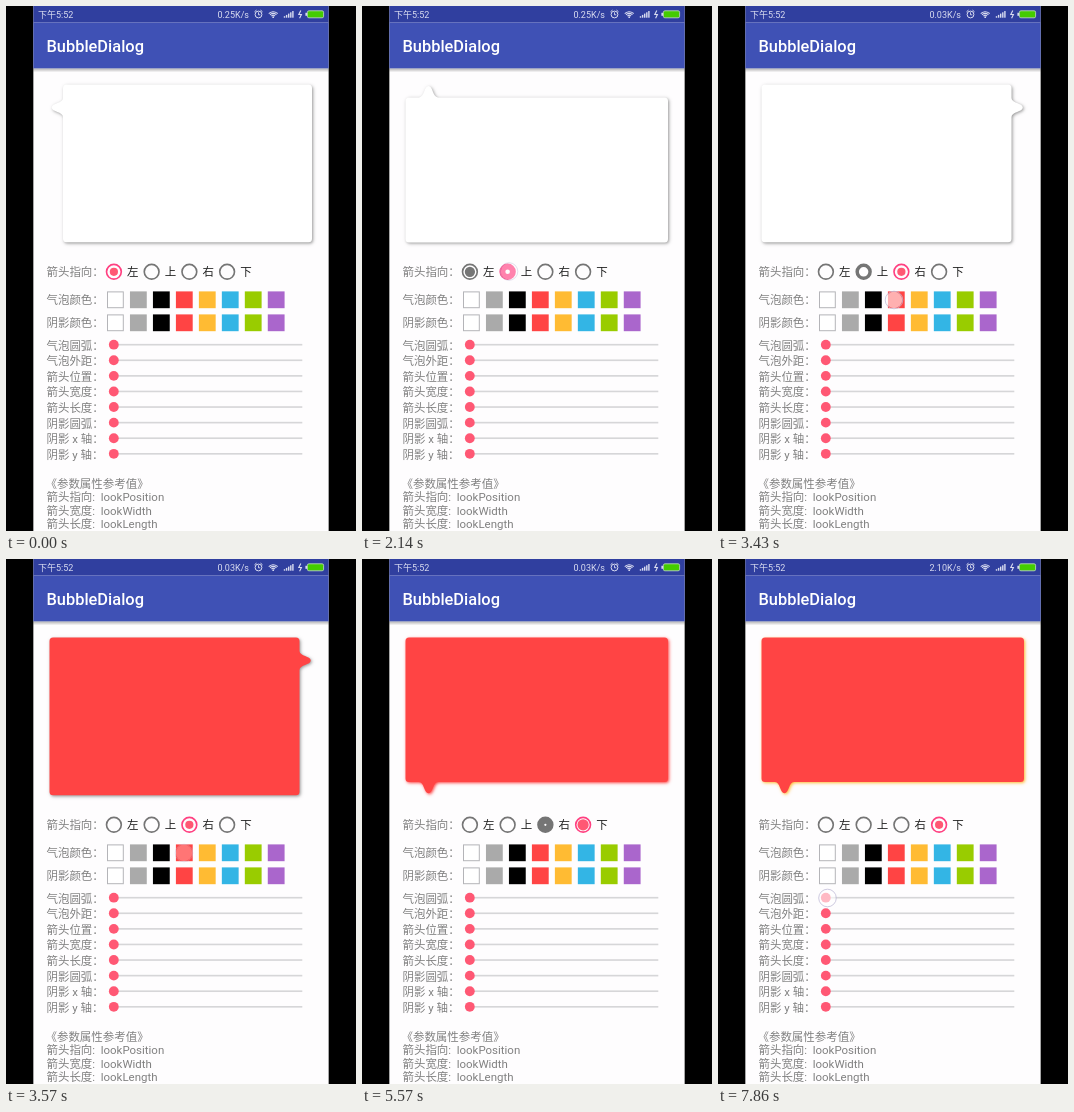
Recreate the animation shown at these times as an HTML page with a canvas. Size 350 by 525 pixels, loop 8 s.

```html
<!DOCTYPE html>
<html lang="zh-CN">
<head>
<meta charset="utf-8">
<title>BubbleDialog</title>
<style>
html, body { margin: 0; width: 100%; height: 100%; overflow: hidden; background: #000; }
canvas { display: block; width: 350px; height: 525px; }
</style>
</head>
<body>
<canvas id="stage" lang="zh-CN"></canvas>
<script>
const W = 350, H = 525, LOOP = 8000;
const canvas = document.getElementById('stage');
const ratio = window.devicePixelRatio || 1;
canvas.width = W * ratio;
canvas.height = H * ratio;
const ctx = canvas.getContext('2d');

// A 9:16 phone screen, 360 units wide, centred on the stage
const SCREEN_W = H * 9 / 16, LEFT = (W - SCREEN_W) / 2, DP = SCREEN_W / 360;
const MARGIN = LEFT + 16 * DP, BODY = 14 * DP;
const STATUS_H = 20 * DP, BAR_END = 76 * DP;

const FONT = 'Roboto, "Noto Sans CJK SC", "Noto Sans CJK", sans-serif';
const GREY = '#757575', LABEL = '#808080', PINK = '#ff4081', CORAL = '#ff5874';
const RED = '#ff4444', ORANGE = '#ffbb33';
const SWATCHES = ['#ffffff', '#aaaaaa', '#000000', RED, ORANGE, '#33b5e5', '#99cc00', '#aa66cc'];
const SLIDERS = ['气泡圆弧', '气泡外距', '箭头位置', '箭头宽度', '箭头长度', '阴影圆弧', '阴影 x 轴', '阴影 y 轴'];
const RADIO_Y = 265.8, RADIO_R = 10 * DP, RADIO_HOLE = 8 * DP, DOT_R = 5 * DP;

// Taps on the radio buttons: time, step at which the bubble turns, direction
const TURNS = [
  { at: 2013, step: 15, dir: 1 },
  { at: 3039, step: 22, dir: 2 },
  { at: 5281, step: 37, dir: 3 }
];

// Finger marks: first step, last step, place, strength
const TOUCHES = [
  [14, 15, 147, 265.5, 0.6], [21, 22, 184, 266, 0.6],
  [24, 24, 176, 294, 1], [25, 25, 178, 294, 0.45],
  [29, 30, 179, 317, 0.9], [36, 36, 225, 266, 0.8],
  [44, 45, 201, 317, 0.9], [55, 55, 109.5, 339, 1]
];

// Body box, then arrow place and turn, for left, up, right, down
const BUBBLES = [
  [57, 78.6, 249, 157.7, 57, 101.5, -90],
  [43.5, 91.4, 262.5, 145, 66.5, 91.4, 0],
  [43.5, 78.6, 250, 157.7, 293.5, 101.5, 90],
  [43.5, 78.6, 262.5, 144.4, 66.5, 223, 180]
];

const clamp = v => Math.max(0, Math.min(1, v));
const mix = (a, b, v) => a + (b - a) * clamp(v);

const stepStart = n => Math.round(n * 100 / 7) * 10;
function stepAt(t) {
  let n = Math.floor((t + 5) * 7 / 1000);
  if (t < stepStart(n)) n--;
  return Math.min(n, 55);
}

function text(str, x, y, size, color, weight = 400, align = 'left') {
  ctx.font = `${weight} ${size}px ${FONT}`;
  ctx.textAlign = align;
  ctx.fillStyle = color;
  ctx.fillText(str, x, y);
}

function rect(x, y, w, h, color) {
  ctx.fillStyle = color;
  ctx.fillRect(x, y, w, h);
}

function disc(x, y, r, color) {
  ctx.beginPath();
  ctx.arc(x, y, r, 0, Math.PI * 2);
  ctx.fillStyle = color;
  ctx.fill();
}

// Circle of outer radius r with a round hole
function ring(x, y, r, hole, color) {
  ctx.beginPath();
  ctx.arc(x, y, (r + hole) / 2, 0, Math.PI * 2);
  ctx.lineWidth = r - hole;
  ctx.strokeStyle = color;
  ctx.stroke();
}

function line(points, width, color) {
  ctx.beginPath();
  points.forEach(([x, y]) => ctx.lineTo(x, y));
  ctx.lineWidth = width;
  ctx.strokeStyle = color;
  ctx.stroke();
}

function statusBar(step) {
  const ink = '#d9dcf0', size = 11 * DP;
  rect(LEFT, 0, SCREEN_W, STATUS_H, '#303f9f');
  text('下午5:52', 32, 11.8, size, ink);
  const speed = step < 23 ? '0.25K/s' : step < 51 ? '0.03K/s' : '2.10K/s';
  text(speed, 243, 11.8, size, ink, 400, 'right');

  ring(252.5, 8.5, 3.9, 2.9, ink);
  line([[252.5, 6.3], [252.5, 8.8], [254.3, 8.8]], 0.9, ink);
  line([[248.5, 5.8], [250.5, 4.1]], 1, ink);
  line([[254.5, 4.1], [256.5, 5.8]], 1, ink);

  for (const r of [2.3, 4.2, 5.9]) {
    ctx.beginPath();
    ctx.arc(267.2, 11.6, r, -Math.PI * 0.77, -Math.PI * 0.23);
    ctx.lineWidth = 1.1;
    ctx.strokeStyle = ink;
    ctx.stroke();
  }
  disc(267.2, 11.2, 0.9, ink);

  for (let i = 0; i < 5; i++) rect(277.8 + i * 2.1, 10.2 - i * 1.3, 1.4, 1.5 + i * 1.3, ink);

  line([[294.8, 4.5], [292.8, 8.5], [295.4, 8.5], [293.6, 12.2]], 1.1, ink);

  rect(299.4, 6.8, 1.8, 3, ink);
  ctx.beginPath();
  ctx.roundRect(301.4, 4.8, 16.2, 7, 1.5);
  ctx.fillStyle = '#44cc00';
  ctx.fill();
  ctx.lineWidth = 0.8;
  ctx.strokeStyle = '#c4dcc8';
  ctx.stroke();
}

function toolbar() {
  const shade = ctx.createLinearGradient(0, BAR_END, 0, BAR_END + 4);
  shade.addColorStop(0, 'rgba(0,0,0,.3)');
  shade.addColorStop(1, 'rgba(0,0,0,0)');
  rect(LEFT, BAR_END, SCREEN_W, 4, shade);
  rect(LEFT, STATUS_H, SCREEN_W, BAR_END - STATUS_H, '#3f51b5');
  text('BubbleDialog', MARGIN, 46, 20 * DP, '#fff', 500);
}

function bubble(dir, fill, shadow) {
  const [x, y, w, h, ax, ay, turn] = BUBBLES[dir];
  const path = new Path2D();
  path.roundRect(x, y, w, h, 3.5);
  const arrow = new Path2D();
  arrow.moveTo(-9.5, 1);
  arrow.lineTo(-9.5, 0);
  arrow.bezierCurveTo(-4.2, 0, -4.5, -11.3, 0, -11.3);
  arrow.bezierCurveTo(4.5, -11.3, 4.2, 0, 9.5, 0);
  arrow.lineTo(9.5, 1);
  arrow.closePath();
  path.addPath(arrow, new DOMMatrix().translate(ax, ay).rotate(turn));

  ctx.save();
  ctx.shadowColor = shadow;
  ctx.shadowBlur = 3.2 * ratio;
  ctx.shadowOffsetX = ctx.shadowOffsetY = 1.1 * ratio;
  ctx.fillStyle = fill;
  ctx.fill(path);
  ctx.restore();
}

// Ring closes to a full disc, then a dot shrinks inside it
function radioOn(x, ms) {
  if (ms < 200) return ring(x, RADIO_Y, RADIO_R, mix(RADIO_HOLE, 0, ms / 200), PINK);
  ring(x, RADIO_Y, RADIO_R, RADIO_HOLE, PINK);
  disc(x, RADIO_Y, mix(7, DOT_R, (ms - 200) / 190), CORAL);
}

// Dot grows to a full disc, then a hole opens in it
function radioOff(x, ms) {
  if (ms >= 260) return ring(x, RADIO_Y, RADIO_R, mix(0, RADIO_HOLE, (ms - 260) / 180), GREY);
  ring(x, RADIO_Y, RADIO_R, RADIO_HOLE, GREY);
  disc(x, RADIO_Y, mix(DOT_R, RADIO_R, (ms / 260) ** 2), GREY);
}

function radios(dir, last, ms) {
  text('箭头指向：', MARGIN, 270.2, BODY, LABEL);
  [...'左上右下'].forEach((name, i) => {
    const x = 107.9 + i * (32 * DP + BODY);
    if (i === dir) radioOn(x, ms);
    else radioOff(x, i === last ? ms : Infinity);
    text(name, x + 16 * DP, 270.2, BODY, '#222');
  });
}

function swatchRow(label, y) {
  const size = 16.8, gap = 28 * DP;
  text(label, MARGIN, y + 4.4, BODY, LABEL);
  SWATCHES.forEach((color, i) => {
    const x = 101 + i * gap, top = y - size / 2;
    rect(x, top, size, size, color);
    if (i) return;
    ctx.lineWidth = 1;
    ctx.strokeStyle = '#b4b4b8';
    ctx.strokeRect(x + 0.5, top + 0.5, size - 1, size - 1);
  });
}

function sliders() {
  SLIDERS.forEach((label, i) => {
    const y = 338.7 + i * 19 * DP;
    text(label + '：', MARGIN, y + 4.9, BODY, LABEL);
    rect(107.8, y - DP, 188.5, 2 * DP, '#d6d6d8');
    disc(107.8, y, 6 * DP, CORAL);
  });
}

function notes() {
  text('《参数属性参考值》', MARGIN - 1, 482, BODY, LABEL);
  [['箭头指向:', 'lookPosition'], ['箭头宽度:', 'lookWidth'], ['箭头长度:', 'lookLength']].forEach(([name, key], i) => {
    const y = 495.4 + i * 13.4;
    text(name, MARGIN, y, BODY, LABEL);
    text(key, 94.7, y, BODY, LABEL);
  });
}

function touches(step) {
  for (const [from, to, x, y, force] of TOUCHES) {
    if (step < from || step > to) continue;
    disc(x, y, 8.2, `rgba(255,255,255,${0.58 * force})`);
    ring(x, y, 9.3, 8.3, `rgba(190,184,214,${0.75 * force})`);
  }
}

function draw(t) {
  const step = stepAt(t);
  const turns = TURNS.filter(turn => step >= turn.step);
  const now = turns[turns.length - 1];
  const dir = now ? now.dir : 0;
  const ms = now ? step * 1000 / 7 - now.at : Infinity;
  const fill = step < 25 ? '#ffffff' : RED;
  const shadow = step < 30 ? '#999999' : step < 45 ? RED : ORANGE;

  ctx.setTransform(ratio, 0, 0, ratio, 0, 0);
  rect(0, 0, W, H, '#000');
  rect(LEFT, 0, SCREEN_W, H, '#fefdfe');
  toolbar();
  statusBar(step);
  bubble(dir, fill, shadow);
  radios(dir, dir - 1, ms);
  swatchRow('气泡颜色：', 293.8);
  swatchRow('阴影颜色：', 316.8);
  sliders();
  notes();
  touches(step);
}

const start = performance.now();
function tick() {
  draw((performance.now() - start) % LOOP);
  requestAnimationFrame(tick);
}
tick();
</script>
</body>
</html>
```
